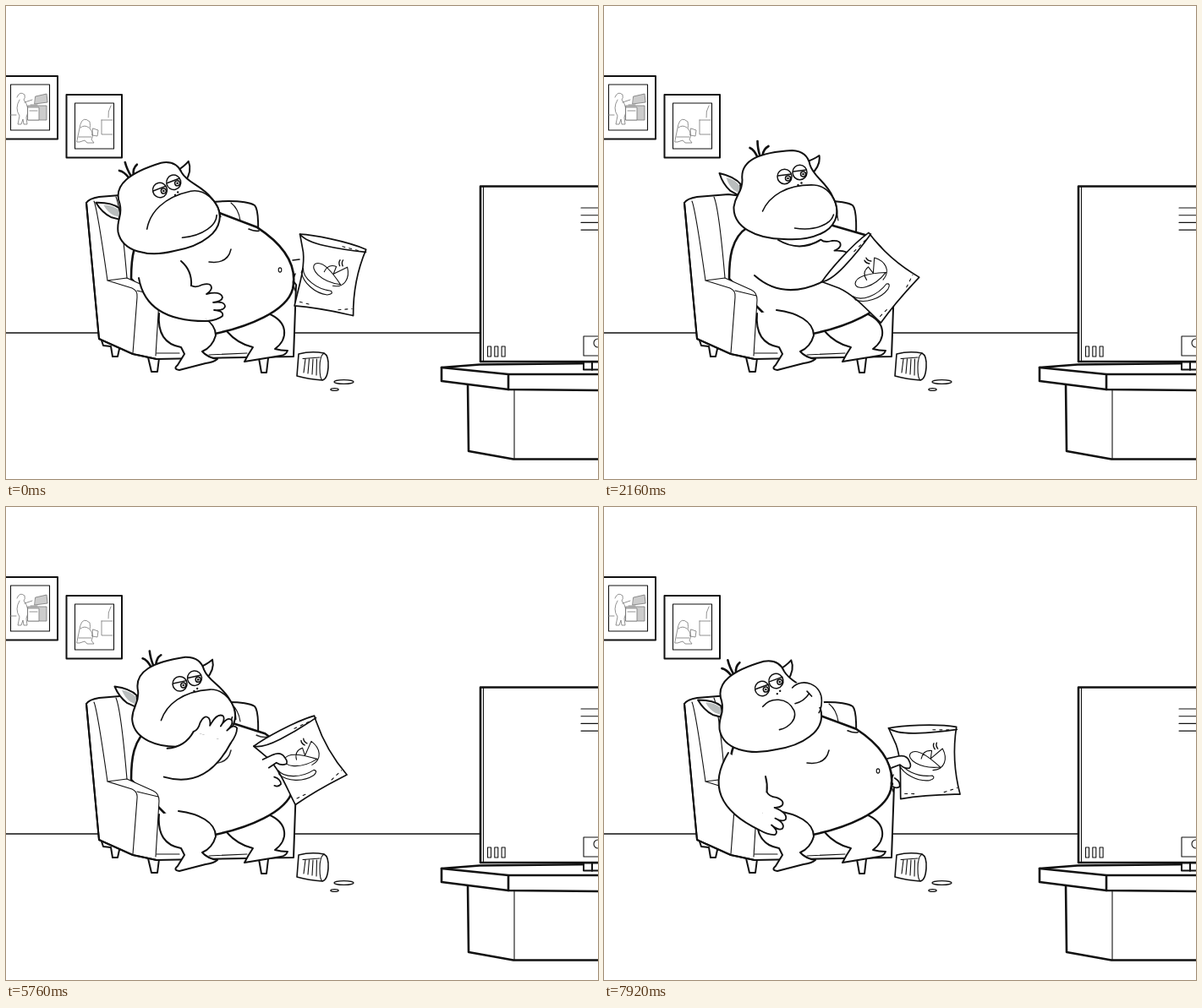
Animation of 700 by 560 pixels, one loop 8 s. Source, as an HTML page:

```html
<!DOCTYPE html>
<html lang="en">
<head>
<meta charset="utf-8">
<title>Snack time</title>
<style>
  html, body { margin: 0; height: 100%; overflow: hidden; background: #fff; }
  svg { display: block; width: 700px; height: 560px; }
  .ink { fill: #fff; stroke: #111; stroke-width: 2; stroke-linecap: round; stroke-linejoin: round; }
  .line { fill: none; }
  .thin { stroke-width: 1.1; }
  .bold { stroke-width: 2.6; }
  .faint { stroke: #777; stroke-width: .8; }
  .dot { fill: #111; stroke: none; }
  .bare { stroke: none; }
</style>
</head>
<body>
<svg viewBox="0 0 700 560" class="ink">
  <defs>
    <g id="eye" stroke-width="1.5">
      <ellipse rx="8.5" ry="8.7"/>
      <path class="line" d="M-8-1L8-3"/>
      <circle cx="4" cy="2" r="3"/><circle class="dot" cx="4" cy="2" r="1.3"/>
    </g>
    <g id="frame">
      <path d="M0 0H65.500V74.500H0Z"/>
      <path class="thin" d="M10 10H56V64H10Z"/>
    </g>
  </defs>

  <g id="room">
    <path class="line" stroke-width="1.4" d="M0 387H110M342 387H561"/>
    <use href="#frame" x="-4.500" y="83"/>
    <use href="#frame" x="71.500" y="105"/>
    <g class="faint">
      <path d="M13 108q3-8 9-3 1 4-1 6 8 10 3 21l1 8h-4l-1-6-2 6h-4l2-10q-6-9 0-19M22 114l9-3M5 129h7"/>
      <path fill="#ccc" d="M35 107l13-3 1 10-15 2zM26 118h22v17H26z"/>
      <path d="M26 120h13v15H26zM28 124h9M29 117h8"/>
      <path d="M88 140q3-10 11-3 1 5 0 8 6 6 2 13l3 4h-8l-3-3-6 2h-3zM88 144q5-4 10 0M86 155h15M103 145l6 2-1 7-6-1zM113 135h13M113 135v17h13M124 118q-4 7-3 14"/>
    </g>
    <path d="M561 213.500H705V421H561Z" stroke-width="2.600"/>
    <path class="line thin" d="M564.500 214V420"/>
    <path id="vents" class="thin"/>
    <path class="thin" d="M683 391h22v23h-22z"/>
    <circle class="thin" cx="700" cy="399" r="5"/>
    <path d="M546 446L547 527 600 536.500H705V446Z" stroke-width="2.600"/>
    <path class="line thin" d="M601 454V536"/>
    <path d="M515 428L560 424.500 705 423V455L594 454 515 444Z" stroke-width="2.600"/>
    <path class="line bold" d="M515 428L594 436H700M594 436V454"/>
    <path d="M683 421.500h22v9h-22zM693 422v9"/>
    <path stroke-width="1.600" d="M346 412Q361 408 376 411 382 414 381 428 380 442 374 443 358 442 344 438Z"/>
    <path class="line thin" d="M376 411Q371 414 371 428 371 441 374 443"/>
    <path id="ribs" class="line thin"/>
    <ellipse stroke-width="1.400" cx="399.500" cy="445" rx="11.500" ry="2.400"/>
    <ellipse stroke-width="1.400" cx="388.500" cy="454" rx="4.600" ry="1.400"/>
  </g>

  <g id="chair">
    <path d="M113 396l2 6 9 1 2 12h6l2-9M168 416l4 17h7l2-16M299 417l3 17h6l2-17"/>
    <path d="M95 233Q98 228 110 226L147 223 230 233Q280 228 294 236 299 241 298 270L343 330 340 415 178 418 150 412 110 394Z"/>
    <path class="line thin" d="M266 233Q275 240 277 254M104 231Q108 240 120 325M130 226Q136 240 143 322M178 411H205M240 413L285 411"/>
  </g>

  <path d="M310 364C334 374 334 394 318 406Q325 408 333 408 331 413 325 414L282 421Q286 413 292 404 274 400 261 385"/>
  <path id="body" class="bold"/>
  <g id="belly" class="line">
    <path class="line" stroke-width="1.500" d="M240 303Q262 306 266 288"/>
    <ellipse class="thin" cx="324" cy="312.500" rx="1.800" ry="2.600"/>
    <path stroke-width="1.600" d="M339 301L347 300M342 317q-5 10 0 20"/>
    <path id="fold" stroke-width="1.700"/>
  </g>
  <path d="M204 360C228 363 248 373 248 390Q244 404 232 409 238 416 250 418 245 422 236 423L205 431Q197 430 203 425L211 412 207 404Q178 399 181 364"/>
  <path class="bare" d="M120 325L143 322 178 337 181 348 177 414 150 411 112 394Z"/>
  <path class="line thin" d="M120 325L143 322 174 336Q181 339 181 348L177 414M120 325L149 334Q156 337 155 345L150 411M155 337L180 343"/>
  <path class="line" d="M95 233L110 394 150 412 178 418"/>

  <g id="head">
    <path d="M161 211Q154 202 136 198 140 211 149 219L158 224Z"/>
    <path fill="#b9bdbd" class="bare" d="M160 213Q154 205 144 203 147 213 153 218L160 222Z"/>
    <path d="M237 185Q247 182 254 177 256 189 244 200Z"/>
    <path class="line bold" d="M181 179Q177 170 172 168M184 178Q181 168 181 160M187 177Q188 169 194 166"/>
    <path d="M163 206C160 182 185 173 222 171Q240 172 243 188C247 202 262 208 270 226 280 244 274 262 255 270 240 277 225 277 212 276 180 276 152 262 153 238 155 222 163 222 163 206Z"/>
    <use href="#eye" x="213" y="202"/>
    <use href="#eye" x="231" y="197"/>
    <circle class="dot" cx="229" cy="212" r="1.200"/><circle class="dot" cx="233" cy="209.500" r="1.200"/>
    <path id="frown" class="line" stroke-width="1.600" d="M187 243C195 225 215 211 248 212 264 213 277 230 275 250M225 263C250 267 268 258 271 247"/>
    <g id="chew" stroke-width="1.600">
      <path class="bare" d="M250 206C262 200 284 214 280 238L262 240Z"/>
      <path class="line" d="M248 209C262 199 284 213 278 233Q276 241 272 245M247 228Q258 228 266 220M264 217l4 7"/>
      <path id="cheek" class="line"/>
    </g>
  </g>

  <path id="armFill" class="bare"/>
  <path id="armLine" class="line"/>
  <path id="hand" stroke-width="1.800" d="M-9-19Q-4-16 4-20 15-23 15-16 14-12 9-9 26-13 28-5 27 0 17 1 31-1 31 6 29 11 18 10 30 11 28 17 22 22 10 23"/>

  <g id="bag" stroke-width="1.700">
    <path d="M345 269C360 269 400 274 424 283 416 305 411 330 413 362 395 359 375 355 343 354 347 330 353 310 350 290Z"/>
    <path class="line" d="M345 269Q352 277 375 281T424 286"/>
    <g class="line thin">
      <path stroke-dasharray="3 5" d="M396 281L416 285M349 349L364 352M395 356L411 354"/>
      <path d="M396 326C372 324 358 309 365 303 374 298 388 315 396 326ZM376 312Q380 302 390 305L387 314 403 305C407 318 401 330 387 328"/>
      <path d="M351 309C351 321 368 333 385 334Q389 338 381 339C366 338 352 326 349 314Z"/>
      <path stroke-width="1.400" d="M394 297q-2 3 0 7M397.500 297q-2 3 0 7"/>
    </g>
  </g>
  <g id="grip" stroke-width="1.700">
    <path d="M-13-6L0-9Q10-11 13-3 16 3 13 5 7 6 2 1 -3 3-8 5"/>
    <path d="M-4 17Q3 21 2 27-2 30-6 27"/>
  </g>
</svg>

<script>
const $ = id => document.getElementById(id);
const LOOP = 8000, STEP = 120;

// head, bag and hand are x, y, angle; bend curves the inner line of the arm
const poses = {
  lounge: { head: [183, 218, -14], bag: [381, 318.5, 8],
    shoulder: [157, 322], elbow: [166, 374], pit: [207, 302], hand: [228, 350, 0], bend: [.25] },
  dig: { head: [212.5, 207, 0], bag: [311, 327, -48.5],
    shoulder: [178, 319], elbow: [215, 352], pit: [206, 277], hand: [262, 297, 10], bend: [-.3] },
  munch: { head: [199, 211, -9], bag: [378, 284, -15],
    shoulder: [193, 320], elbow: [252, 322], pit: [180, 292], hand: [228, 254, -90], bend: [-.25] },
  rest: { head: [186, 215, -13], bag: [381, 303.5, -3],
    shoulder: [147, 291], elbow: [112, 348], pit: [191, 319], hand: [189, 358, 35], bend: [.1] }
};
const moves = [
  { from: 1080, to: 2160, pose: 'dig' },
  { from: 5200, to: 6200, pose: 'munch' },
  { from: 6500, to: 7900, pose: 'rest' }
];

const ease = p => (p = Math.min(1, Math.max(0, p)), p * p * (3 - 2 * p));
const mix = (a, b, p) => Object.fromEntries(Object.keys(a).map(part =>
  [part, a[part].map((v, i) => v + (b[part][i] - v) * p)]));
const poseAt = t => moves.reduce((pose, { from, to, pose: name }) =>
  mix(pose, poses[name], ease((t - from) / (to - from))), poses.lounge);

const place = (id, [x, y, angle], ox = 0, oy = 0) =>
  $(id).setAttribute('transform', `translate(${x} ${y}) rotate(${angle}) translate(${-ox} ${-oy})`);
const draw = (id, d) => $(id).setAttribute('d', d);
const fade = (id, v) => $(id).setAttribute('opacity', v);
const repeat = (n, make) => Array.from({ length: n }, (_, i) => make(i)).join('');

draw('vents', repeat(4, i => `M680 ${239 + i * 8.7}h20`) + repeat(3, i => `M${569.5 + i * 8.3} 403h4v12h-4z`));
draw('ribs', 'M351 417.500L371 416' + repeat(4, i => `M${354 + i * 4.5} 418l${i / 2 - 2} ${16 + i}`));

function drawArm({ shoulder, elbow, pit, hand, bend }) {
  const [x, y, angle] = hand, a = angle * Math.PI / 180;
  const wrist = (u, v) => [x + u * Math.cos(a) - v * Math.sin(a), y + u * Math.sin(a) + v * Math.cos(a)];
  const top = wrist(-9, -19), dx = pit[0] - top[0], dy = pit[1] - top[1];
  const bow = [top[0] + dx / 2 - dy * bend, top[1] + dy / 2 + dx * bend];
  const outer = `${shoulder}Q${elbow} ${wrist(10, 23)}`, inner = `${top}Q${bow} ${pit}`;
  draw('armFill', `M${outer}L${inner}Z`);
  draw('armLine', `M${outer}M${inner}`);
  place('hand', hand);
}

function drawBody(lean) {
  const x = 312 + lean * 1.07, y = 272 + lean * .71;
  draw('body', `M170 262C150 274 148 300 148 323L200 375 247 388C285 380 332 362 339 335
    C344 312 335 287 ${x} ${y}L250 ${y - 18}Z`);
  draw('fold', `M${x - 10} ${y + 2}Q${x - 3} ${y + 5} ${x + 2} ${y + 4}`);
  fade('belly', Math.min(1, -lean / 6));
}

function render(t) {
  const pose = poseAt(t), { head, bag, hand } = pose;
  drawBody(head[2]);

  const sway = Math.cos(Math.PI * Math.min(1, t / 1080));
  const lift = 10 * Math.exp(-(((t - 2450) / 350) ** 2));
  const rummage = t > 3480 && t < 5100 ? Math.sin((t - 3480) / 130) : 0;
  const scratch = t < 840 ? Math.sin(t / 840 * Math.PI * 2) : 0;
  head[0] -= sway;
  head[1] -= lift;
  bag[0] += lift * 1.3;
  bag[1] += sway * 1.5 - lift / 2 + rummage * .6;
  bag[2] += sway * 1.5;
  hand[0] += rummage * 3;
  hand[1] += rummage * 2 + scratch * 2.5;

  place('head', head, 213, 202);
  place('bag', [bag[0], bag[1], bag[2] - 6.5], 381, 317);
  place('grip', [bag[0] - 33, bag[1] + 2, bag[2] / 2 + 3]);
  fade('grip', +(t > 5600));
  drawArm(pose);

  const chewing = t >= 6600, puff = 1.5 * Math.sin((t - 7920) / 76);
  fade('frown', +!chewing);
  fade('chew', +chewing);
  draw('cheek', `M209 223C220 ${214 - puff} ${240 + puff} 218 ${244 + puff} 236
    C245 246 235 ${254 + puff} 222 ${254 + puff}`);
}

function frame() {
  const t = performance.now() % LOOP;
  render(Math.floor(t / STEP) * STEP);
  requestAnimationFrame(frame);
}
frame();
</script>
</body>
</html>
```
